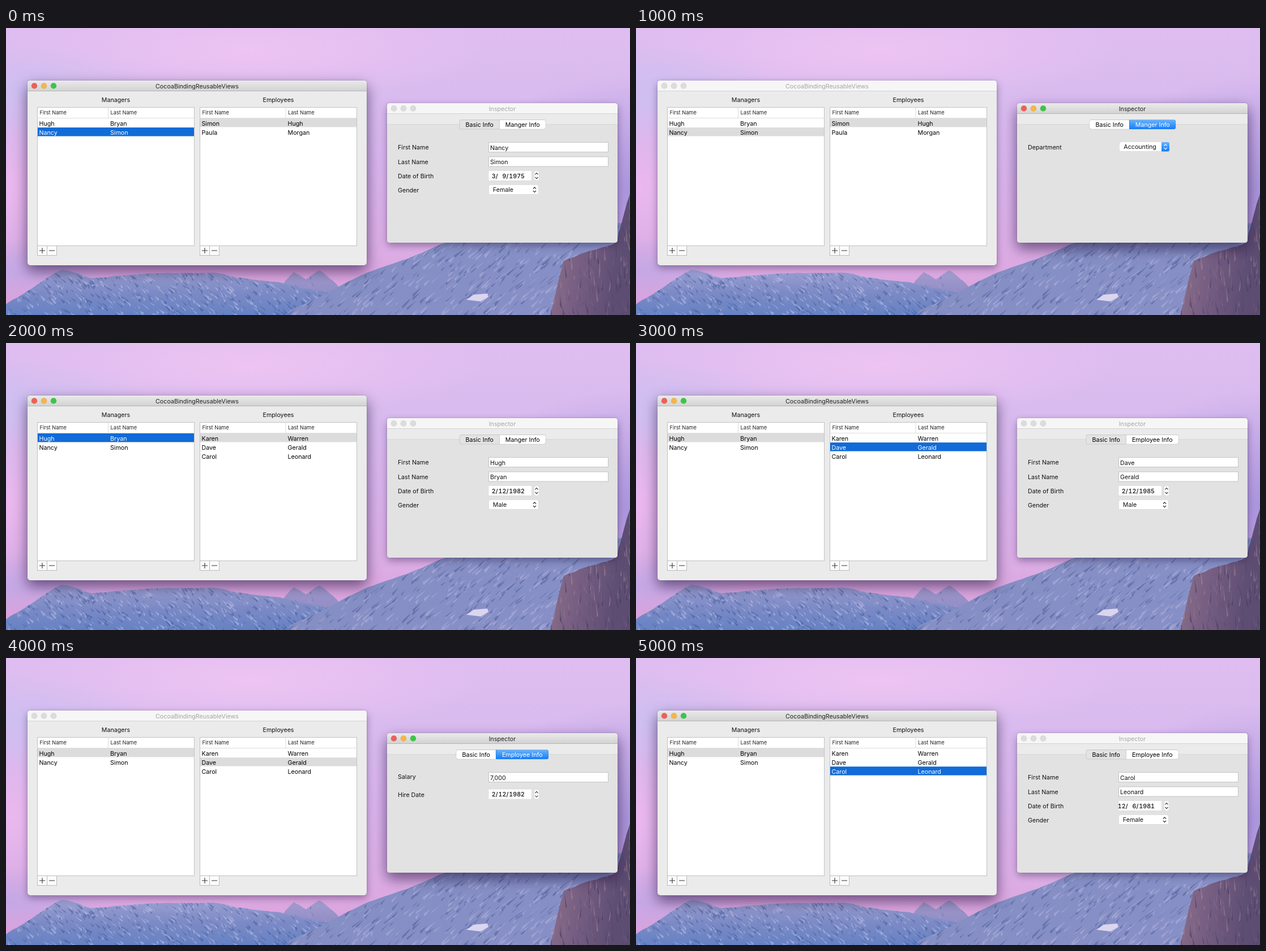
An HTML page for the animation above (6000 ms loop, 1102x508 px).

```html
<!DOCTYPE html>
<html lang="en">
<head>
<meta charset="utf-8">
<title>Reusable views</title>
<style>
  html, body { margin: 0; width: 100%; height: 100%; overflow: hidden; }
  svg { display: block; width: 100%; height: 100%; }
  text { font: 10.7px Inter, Roboto, sans-serif; white-space: pre; }
  .head { font-size: 9.25px; fill: #222; }
  .mid { text-anchor: middle; }
  .date { text-anchor: end; font-weight: 500; font-variant-numeric: tabular-nums; }
  .line { fill: none; stroke-width: 1.1; }
  .front { filter: drop-shadow(0 10px 12px rgba(25, 8, 60, .5)) drop-shadow(0 0 1px rgba(0, 0, 0, .25)); }
  .back { filter: drop-shadow(0 5px 7px rgba(25, 8, 60, .33)) drop-shadow(0 0 1px rgba(0, 0, 0, .2)); }
  .raised { filter: drop-shadow(0 .6px .5px rgba(0, 0, 0, .35)); }
  .state { visibility: hidden; animation: show 6s step-end infinite; }
  @keyframes show {
    0% { visibility: visible; }
    16.66667%, 100% { visibility: hidden; }
  }
</style>
</head>
<body>
<svg viewBox="0 0 1102 508" preserveAspectRatio="none">
  <defs id="fills"></defs>
  <g id="wallpaper"></g>
  <g id="screen"></g>
</svg>
<script>
const $ = id => document.getElementById(id);

// ---------- fills ----------
const gradient = (id, colors, turn = 90) =>
  `<linearGradient id="${id}" gradientTransform="rotate(${turn})">` +
  colors.map((c, i) => `<stop offset="${i / (colors.length - 1)}" stop-color="${c}"/>`).join('') +
  '</linearGradient>';

$('fills').innerHTML =
  gradient('sky', ['#dfbdf0', '#d9bbef', '#d9b4ec', '#dcaee6', '#dc9fd8']) +
  gradient('far', ['#a59dd0', '#7b7db8']) +
  gradient('left', ['#9ca0d2', '#7c8ac5', '#6682c4']) +
  gradient('right', ['#66719f', '#858fc4', '#8790c6'], 35) +
  gradient('rock', ['#94758c', '#775f83', '#5d4d73'], 15) +
  gradient('bar', ['#eaeaea', '#d3d3d3']) +
  gradient('blue', ['#6bb3fa', '#127dfb']);

// ---------- wallpaper ----------
let seed = 11;
const rnd = () => (seed = (seed * 16807) % 2147483647) / 2147483647;
const spread = n => (rnd() - .5) * n;

function glow(id, x, y, rx, ry, color) {
  return `<radialGradient id="${id}"><stop stop-color="${color}" stop-opacity=".8"/>
    <stop offset="1" stop-color="${color}" stop-opacity="0"/></radialGradient>
    <ellipse cx="${x}" cy="${y}" rx="${rx}" ry="${ry}" fill="url(#${id})"/>`;
}

// Breaks a ridge into ever smaller jagged pieces.
function crumble(pts, depth, rough) {
  if (!depth) return pts;
  const out = [pts[0]];
  for (let i = 1; i < pts.length; i++) {
    const [[ax, ay], [bx, by]] = [pts[i - 1], pts[i]];
    out.push([(ax + bx) / 2, (ay + by) / 2 + spread(rough)], pts[i]);
  }
  return crumble(out, depth - 1, rough / 2);
}

// Scatters small flat shards that lean along (dx, dy).
function shards(n, x, w, y, [dx, dy], color) {
  let d = '';
  for (let i = 0; i < n; i++) {
    const k = .3 + rnd(), at = [x + rnd() * w, y + rnd() * (508 - y)];
    d += `M${at.map(v => v.toFixed(1))}l${dx * k + spread(6)} ${dy * k}l${spread(6)} ${2 + rnd() * 3}z`;
  }
  return `<path d="${d}" fill="${color}" opacity=".5"/>`;
}

function mountain(id, ridge, rough, lean, dark, light, n) {
  const xs = ridge.map(p => p[0]), x = Math.min(...xs), w = Math.max(...xs) - x;
  const top = Math.min(...ridge.map(p => p[1]));
  const shape = `M${crumble(ridge, 4, rough).map(p => p.map(v => v.toFixed(1))).join('L')}V508H${x}z`;
  return `<clipPath id="${id}-clip"><path d="${shape}"/></clipPath><path d="${shape}" fill="url(#${id})"/>
    <g clip-path="url(#${id}-clip)">${shards(n, x, w, top, lean, dark)}${shards(n, x, w, top, lean, light)}</g>`;
}

$('wallpaper').innerHTML =
  '<rect width="1102" height="508" fill="url(#sky)"/>' +
  glow('pink', 430, 40, 420, 90, '#f1c6f3') +
  glow('haze', 20, 110, 240, 80, '#cbc0f1') +
  glow('rose', 0, 280, 130, 110, '#efb9ee') +
  glow('dusk', 1110, 290, 310, 210, '#9d8dd8') +
  glow('mist', 0, 430, 200, 60, '#bda8e6') +
  mountain('far', [[480, 466], [508, 432], [530, 445], [554, 429], [600, 470]], 5, [5, 7], '#5f659f', '#c9bce0', 30) +
  mountain('left', [[0, 489], [97, 428], [150, 443], [366, 433], [483, 450], [640, 478]], 8, [9, 6], '#405a99', '#c6c6ec', 380) +
  mountain('right', [[500, 500], [640, 432], [776, 380], [940, 335], [1102, 345]], 7, [-14, 11], '#4a5b98', '#b9b8e0', 420) +
  '<path d="M813 481l13-9 24-2 2 6-14 8z" fill="#dcd5ef"/>' +
  mountain('rock', [[961, 508], [985, 412], [1078, 380], [1102, 293]], 9, [2, 20], '#3b335a', '#b08c96', 120);

// ---------- drawing helpers ----------
const text = (x, y, s, cls = '', fill = '#111') =>
  `<text x="${x}" y="${y}" class="${cls}" fill="${fill}">${s}</text>`;
const rect = (x, y, w, h, fill, extra = '') =>
  `<rect x="${x}" y="${y}" width="${w}" height="${h}" fill="${fill}" ${extra}/>`;
const line = (d, color) => `<path class="line" d="${d}" stroke="${color}"/>`;
const topBar = (x, y, w, h) => `M${x} ${y + h}v${5 - h}q0-5 5-5h${w - 10}q5 0 5 5v${h - 5}z`;

function frame(x, y, w, h, title, active) {
  const lights = active ? ['#ed6058', '#f3b64b', '#3cc54a'] : Array(3).fill('#dcdcdc');
  return rect(x, y, w, h, '#ebebeb', `rx="5" class="${active ? 'front' : 'back'}"`) +
    `<path d="${topBar(x, y, w, 18)}" fill="${active ? 'url(#bar)' : '#f6f6f6'}"/>` +
    line(`M${x} ${y + 18.5}h${w}`, active ? '#b5b5b5' : '#d4d4d4') +
    lights.map((c, i) => `<circle cx="${x + 12 + i * 17}" cy="${y + 9.4}" r="5.1" fill="${c}"
      stroke="#000" stroke-opacity=".1" stroke-width=".6"/>`).join('') +
    text(x + w / 2, y + 13.6, title, 'mid', active ? '#222' : '#a6a6a6');
}

function table(x, split, title, people, picked, focused) {
  const w = 277, left = x + 3, col = split + 3.5;
  const rows = people.map((p, i) => {
    const y = 160 + i * 16.1, lit = focused && i === picked;
    const ink = lit ? '#fff' : '#000';
    return (i === picked ? rect(x + .5, y, w - 1, 15.4, lit ? '#116bd8' : '#dcdcdc') : '') +
      text(left, y + 12.8, p.first, '', ink) + text(col, y + 12.8, p.last, '', ink);
  }).join('');
  return text(x + 138.5, 131, title, 'mid') +
    rect(x, 140.5, w, 245, '#fff', 'stroke="#c1c1c1"') +
    line(`M${x} 159.5h${w}M${split} 141v18`, '#dedede') +
    text(x + 4, 153.2, 'First Name', 'head') + text(col + .5, 153.2, 'Last Name', 'head') + rows +
    rect(x, 385.5, 34, 17, '#fbfbfb', 'stroke="#bcbcbc"') + line(`M${x + 17} 386v16`, '#bcbcbc') +
    line(`M${x + 3.5} 394h10m-5-5v10M${x + 20.5} 394h10`, '#333');
}

const chevrons = (x, y, color, gap = 1.6) =>
  line(`M${x - 2.6} ${y - gap}l2.6-2.8 2.6 2.8M${x - 2.6} ${y + gap}l2.6 2.8 2.6-2.8`, color);

const field = (y, value) =>
  rect(852.5, y, 211, 17, '#fff', 'stroke="#c4c4c4"') + text(855, y + 13.2, value);

function dateField(y, [month, day, year]) {
  const padded = String(day).padStart(2, '\u2007');
  return rect(852, y, 76.5, 18, '#fff', 'stroke="#d4d4d4" stroke-width=".6"') +
    text(916, y + 13.4, `${month}/\u200a${padded}/\u200a${year}`, 'date') +
    rect(932.5, y + .8, 9, 17, '#fff', 'rx="4" class="raised"') +
    chevrons(937, y + 9.3, '#333', 2.2);
}

function popup(x, y, value, active) {
  return rect(x, y, 88, 16.4, '#fff', 'rx="3.2" class="raised"') +
    (active ? `<path d="M${x + 74} ${y}h11q3 0 3 3v10.4q0 3-3 3h-11z" fill="url(#blue)"/>` : '') +
    text(x + 7.3, y + 12.2, value) + chevrons(x + 81, y + 8.2, active ? '#fff' : '#222');
}

function tabs(x, split, w, second, tab) {
  const y = 162.5, h = 16.5, end = x + w;
  const first = `M${split} ${y}H${x + 3}q-3 0-3 3v${h - 6}q0 3 3 3H${split}z`;
  const last = `M${split} ${y}H${end - 3}q3 0 3 3v${h - 6}q0 3-3 3H${split}z`;
  return rect(x, y, w, h, '#fff', 'rx="3" class="raised"') +
    `<path d="${tab ? last : first}" fill="${tab ? 'url(#blue)' : '#e3e3e3'}"/>` +
    rect(x, y, w, h, 'none', 'rx="3" stroke="#000" stroke-opacity=".16" stroke-width=".7"') +
    line(`M${split} ${y}v${h}`, tab ? '#2d84e6' : '#cfcfcf') +
    text((x + split) / 2, 174.6, 'Basic Info', 'mid', '#000') +
    text((split + end) / 2, 174.6, second, 'mid', tab ? '#fff' : '#000');
}

// ---------- content ----------
const person = (first, last, born, gender, more) => ({ first, last, born, gender, ...more });
const managers = [
  person('Hugh', 'Bryan', [2, 12, 1982], 'Male', { staff: [
    person('Karen', 'Warren'),
    person('Dave', 'Gerald', [2, 12, 1985], 'Male', { salary: '7,000', hired: [2, 12, 1982] }),
    person('Carol', 'Leonard', [12, 6, 1981], 'Female')
  ] }),
  person('Nancy', 'Simon', [3, 9, 1975], 'Female', { dept: 'Accounting', staff: [
    person('Simon', 'Hugh'),
    person('Paula', 'Morgan')
  ] })
];

function details(p, isManager, tab) {
  const label = (y, s) => text(692, y, s);
  if (!tab) {
    return ['First Name', 'Last Name', 'Date of Birth', 'Gender']
      .map((s, i) => label(215.2 + i * 25.4, s)).join('') +
      field(202.5, p.first) + field(228, p.last) +
      dateField(252.3, p.born) + popup(852.5, 278, p.gender, false);
  }
  return isManager
    ? label(215.2, 'Department') + popup(854, 202, p.dept, true)
    : label(213.6, 'Salary') + field(202.5, p.salary) +
      label(245.6, 'Hire Date') + dateField(232, p.hired);
}

function scene([boss, worker, focus, tab]) {
  const isManager = focus === 'boss', { staff } = managers[boss];
  return frame(38, 93, 599, 327, 'CocoaBindingReusableViews', !tab) +
    table(55.5, 180.5, 'Managers', managers, boss, !tab && isManager) +
    table(342.5, 494, 'Employees', staff, worker, !tab && !isManager) +
    frame(673, 133, 407, 247, 'Inspector', !!tab) +
    '<path d="M673 170.5h407v204.500q0 5-5 5h-397q-5 0-5-5z" fill="#e2e2e2"/>' +
    line('M673 170.5h407', '#d7d7d7') +
    (isManager ? tabs(801, 871.5, 152, 'Manger Info', tab) : tabs(795, 865.5, 163, 'Employee Info', tab)) +
    details(isManager ? managers[boss] : staff[worker], isManager, tab);
}

// [manager row, employee row, focused list, inspector tab]
const steps = [
  [1, 0, 'boss', 0],
  [1, 0, 'boss', 1],
  [0, 0, 'boss', 0],
  [0, 1, 'worker', 0],
  [0, 1, 'worker', 1],
  [0, 2, 'worker', 0]
];
$('screen').innerHTML = steps.map((s, i) =>
  `<g class="state" style="animation-delay:${i ? i - steps.length : 0}s">${scene(s)}</g>`).join('');
</script>
</body>
</html>
```
